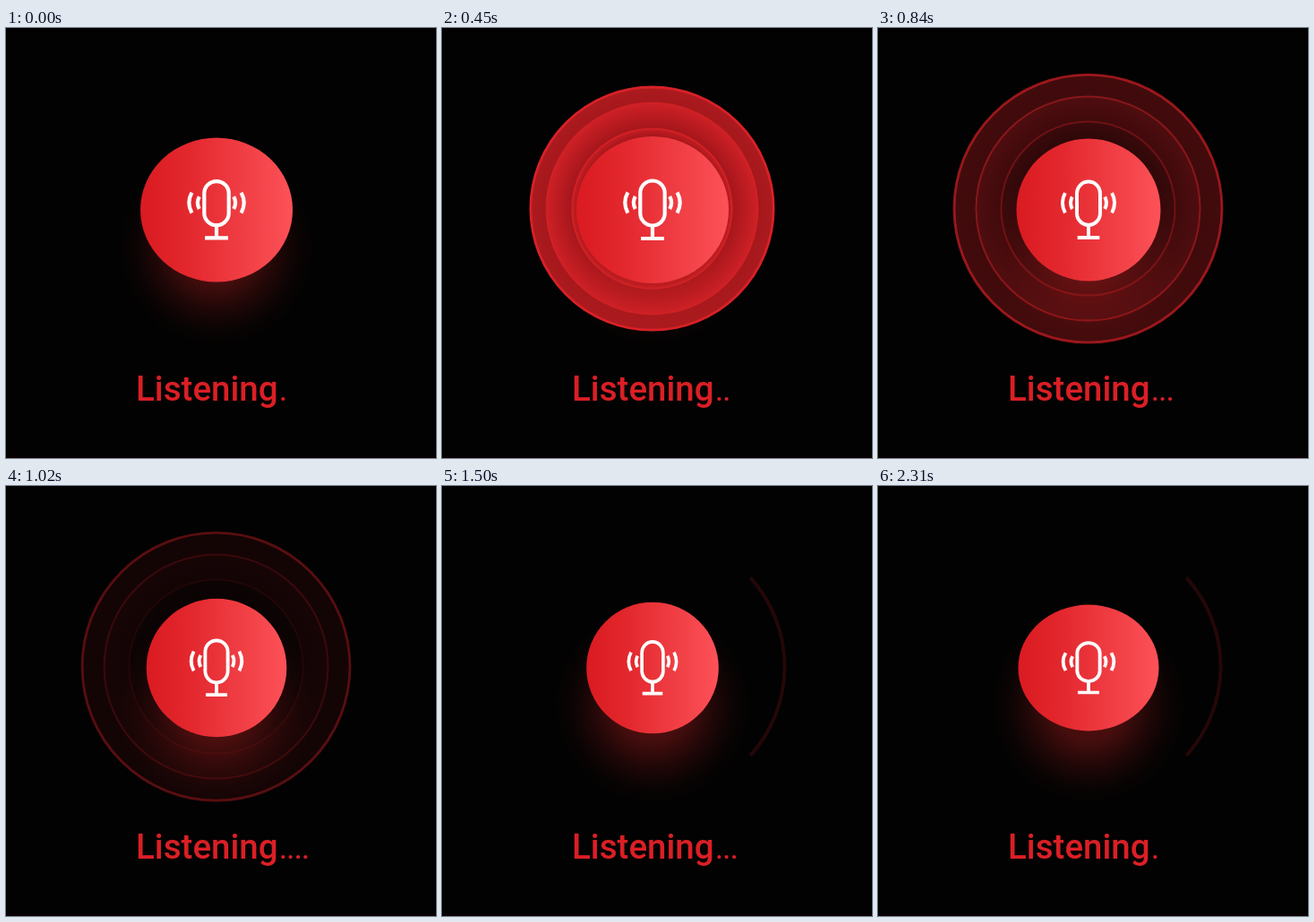
Animation of 480 by 480 pixels, one loop 2.34 s. Source, as an HTML page with a canvas:

```html
<!DOCTYPE html>
<html lang="en">
<head>
<meta charset="utf-8">
<title>Listening</title>
<style>
  html, body { margin: 0; width: 100%; height: 100%; overflow: hidden; background: #020202; }
  canvas { display: block; width: 480px; height: 480px; }
</style>
</head>
<body>
<canvas id="stage" width="480" height="480"></canvas>
<script>
const ctx = document.getElementById('stage').getContext('2d');
const LOOP = 2340, STEP = 30;
const CX = 235, CY = 203, RING_X = 234.5, RING_Y = 201.6;
const TAU = Math.PI * 2;

// [time, horizontal radius, vertical radius]
const BUTTON_KEYS = [
  [0, 85, 80.5], [210, 86.5, 80.5], [450, 85, 82], [630, 83, 82],
  [1020, 78.3, 77.2], [1110, 77.8, 76.8], [1500, 73.8, 73.3],
  [1650, 74, 73], [2190, 77.5, 70.6], [2310, 78.5, 70.4]
];

// Radius grows linearly from `base` at 210 ms until it reaches `max`.
const RINGS = [
  { base: 102.6, rate: 0.1375, max: 149.5, inner: '#a5181c', outer: '#ab1a1e', line: '#d82127', width: 2.8, lineFade: 0.6, fillFade: 1.4 },
  { base: 89, rate: 0.12, max: 125, inner: '#a4161b', outer: '#cd2026', line: '#d02126', width: 2, lineFade: 1, fillFade: 1.4 },
  { base: 70, rate: 0.08, max: 97, inner: '#a2161a', outer: '#c41d22', line: '#d02126', width: 2, lineFade: 1.5, fillFade: 1.8 }
];

const clamp = (v, lo, hi) => Math.min(hi, Math.max(lo, v));

function buttonRadii(t) {
  let i = 0;
  while (i < BUTTON_KEYS.length - 2 && t > BUTTON_KEYS[i + 1][0]) i++;
  const a = BUTTON_KEYS[i], b = BUTTON_KEYS[i + 1];
  const k = clamp((t - a[0]) / (b[0] - a[0]), 0, 1);
  return [a[1] + (b[1] - a[1]) * k, a[2] + (b[2] - a[2]) * k];
}

function gradient(g, stops) {
  stops.forEach(([at, color]) => g.addColorStop(at, color));
  return g;
}

function strokeArc(x, y, r, from, to) {
  ctx.beginPath();
  ctx.arc(x, y, r, from, to);
  ctx.stroke();
}

function drawRings(t) {
  if (t < 60) return;
  if (t >= 1110) {
    ctx.globalAlpha = 0.16;
    ctx.strokeStyle = RINGS[0].line;
    ctx.lineWidth = 4;
    strokeArc(RING_X, RING_Y, 148, -0.735, 0.735);
    ctx.globalAlpha = 1;
    return;
  }
  const fade = clamp((1140 - t) / 600, 0, 1);
  const radii = RINGS.map(r => clamp(r.base + r.rate * (t - 210), 0, r.max));
  RINGS.forEach((ring, i) => {
    const r = radii[i], hole = radii[i + 1] || 0;
    ctx.globalAlpha = fade ** ring.fillFade;
    ctx.fillStyle = gradient(
      ctx.createRadialGradient(RING_X, RING_Y, hole || 80, RING_X, RING_Y, Math.max(r, 81)),
      [[0, ring.inner], [1, ring.outer]]);
    ctx.beginPath();
    ctx.arc(RING_X, RING_Y, r, 0, TAU);
    if (hole) ctx.arc(RING_X, RING_Y, hole, 0, TAU);
    ctx.fill('evenodd');
  });
  RINGS.forEach((ring, i) => {
    ctx.globalAlpha = fade ** ring.lineFade;
    ctx.strokeStyle = ring.line;
    ctx.lineWidth = ring.width;
    strokeArc(RING_X, RING_Y, radii[i], 0, TAU);
  });
  ctx.globalAlpha = 1;
}

function drawGlow() {
  const tint = a => `rgba(200,35,35,${a})`;
  ctx.fillStyle = gradient(ctx.createRadialGradient(CX, 245, 0, CX, 245, 110),
    [[0, tint(0.4)], [0.36, tint(0.34)], [0.63, tint(0.15)], [0.83, tint(0.045)], [1, tint(0)]]);
  ctx.fillRect(CX - 110, 135, 220, 220);
}

function drawMicrophone() {
  ctx.strokeStyle = '#fff';
  ctx.lineWidth = 4.2;
  ctx.beginPath();
  ctx.roundRect(-13.7, -32.5, 27.4, 50, 13.7);
  ctx.moveTo(0, 17.5);
  ctx.lineTo(0, 32);
  ctx.moveTo(-13, 32);
  ctx.lineTo(13, 32);
  ctx.stroke();
  for (const r of [14.5, 24]) {
    strokeArc(6.5, -8, r, -0.5, 0.5);
    strokeArc(-6.5, -8, r, Math.PI - 0.5, Math.PI + 0.5);
  }
}

function drawButton(t) {
  const [rx, ry] = buttonRadii(t);
  ctx.fillStyle = gradient(ctx.createLinearGradient(CX - rx, 0, CX + rx, 0),
    [[0, '#da1b21'], [0.3, '#e2272d'], [1, '#fc5258']]);
  ctx.beginPath();
  ctx.ellipse(CX, CY, rx, ry, 0, 0, TAU);
  ctx.fill();
  ctx.save();
  ctx.translate(CX, CY);
  ctx.scale(rx / 85, ry / 82);
  drawMicrophone();
  ctx.restore();
}

function drawLabel(t) {
  const phase = Math.floor(t / 325);
  const dots = phase <= 3 ? phase + 1 : Math.max(1, 7 - phase);
  ctx.fillStyle = '#da1f25';
  ctx.font = '500 38.5px Roboto, sans-serif';
  ctx.fillText('Listening', 145, 416);
  ctx.font = '500 30px Roboto, sans-serif';
  ctx.fillText('.'.repeat(dots), 305.2, 416);
}

function draw(t) {
  ctx.fillStyle = '#020202';
  ctx.fillRect(0, 0, 480, 480);
  ctx.fillStyle = '#0a0002';
  ctx.fillRect(0, 477, 480, 3);
  drawRings(t);
  drawGlow();
  drawButton(t);
  drawLabel(t);
}

const start = performance.now();
function tick() {
  const elapsed = (performance.now() - start) % LOOP;
  draw(elapsed < 60 ? 0 : Math.floor(elapsed / STEP) * STEP);
  requestAnimationFrame(tick);
}
tick();
</script>
</body>
</html>
```
